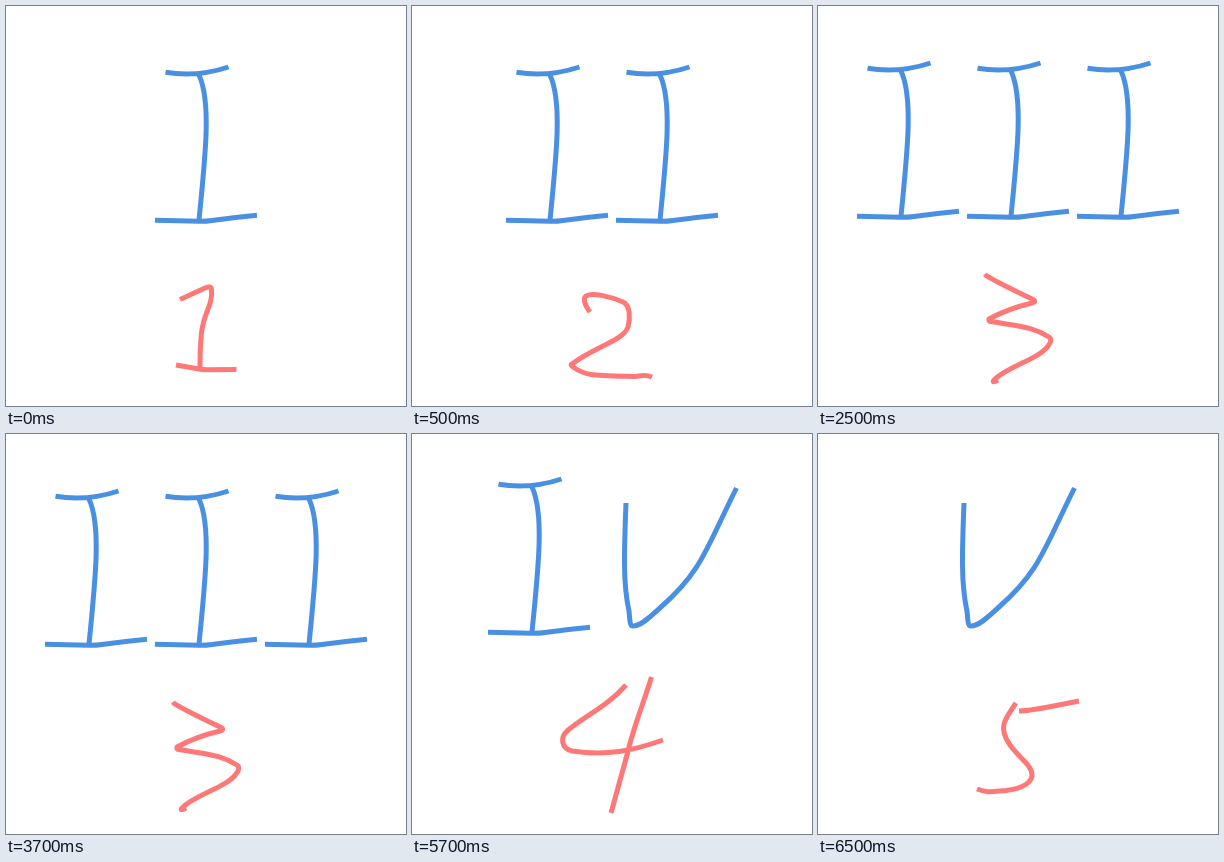
Animation of 400 by 400 pixels, one loop 8000 ms. Source, as an HTML page:

```html
<!DOCTYPE html>
<html lang="en">
<head>
<meta charset="utf-8">
<title>Roman numerals</title>
<style>
  html, body { margin: 0; width: 100%; height: 100%; overflow: hidden; background: #fff; }
  svg { display: block; width: 100vw; height: 100vh; }
  path { fill: none; stroke-width: 5; stroke-linejoin: round; }
  .roman { stroke: #4a90e2; }
  .digit { stroke: #ff7878; }
</style>
</head>
<body>
<svg id="stage" viewBox="0 0 400 400"></svg>
<script>
const LOOP = 8000;

const roman = {
  I: 'M159.5 66.3Q191 71.5 222.5 61M193 69C205 95 200 145 193 214M149 214.2L193 215.3Q200 215.4 206 214.5Q228 211.5 251 209.3',
  V: 'M214 69C212 120 211 150 217 177C218 188 218 192 221 192C230 192 241 180 249 173C290 137 294 115 324.5 54'
};

const digits = [
  'M174 293.5L199 282Q205 279.5 205.5 283C207 300 198 305 195.5 327Q194 340 194 361M170 359L193 363Q197 363.8 202 363.8L230.5 363.5',
  'M178 306C172 298 171 292 174 290C180 286 200 291 211 296C218 299 218.5 312 216 321C211 335 184 340 160 358Q158 359 161 361C174 370 180 369.5 222 370.5C230 370.5 232 367.5 240 371',
  'M167 268L168 269.3C180 277 200 286 216 294Q218 296 214 297C197 301 182 307 171 313Q170 315 173 315.5C205 321 215 321 231 331Q235 334 230 340C220 354 190 360 176 374Q174 376.5 177 375.5L180 374',
  'M214 251C196 272 171 283 155 297C148 304 149 314 160 317C195 322 220 317 251 306M239.5 243C230 274 222 291 215 321L199 379',
  'M198 269C186 286 180 294 192 311C202 325 215 332 214 342C212 351 200 355 188 356.5C172 358 170 359 159 355M201 277C215 277 225 274 261 267'
];

// Start time, then each letter with its offset
const steps = [
  [0, ['I', 0, 0]],
  [500, ['I', -55, 0], ['I', 55, 0]],
  [2500, ['I', -110, -4], ['I', 0, -4], ['I', 110, -4]],
  [4500, ['I', -73, -16], ['V', 0, 0]],
  [6500, ['V', -68, 0]]
];

const stage = document.getElementById('stage');

function add(parent, tag, attrs) {
  const el = document.createElementNS('http://www.w3.org/2000/svg', tag);
  for (const key in attrs) el.setAttribute(key, attrs[key]);
  return parent.appendChild(el);
}

const scenes = steps.map(([start, ...letters], i) => {
  const group = add(stage, 'g', { visibility: i ? 'hidden' : 'visible' });
  for (const [name, x, y] of letters) {
    add(group, 'path', { class: 'roman', d: roman[name], transform: `translate(${x} ${y})` });
  }
  add(group, 'path', { class: 'digit', d: digits[i] });
  return { start, group };
});

const began = performance.now();

function draw() {
  const t = (performance.now() - began) % LOOP;
  const current = scenes.filter(s => s.start <= t).pop();
  for (const s of scenes) {
    s.group.setAttribute('visibility', s === current ? 'visible' : 'hidden');
  }
  requestAnimationFrame(draw);
}
draw();
</script>
</body>
</html>
```
